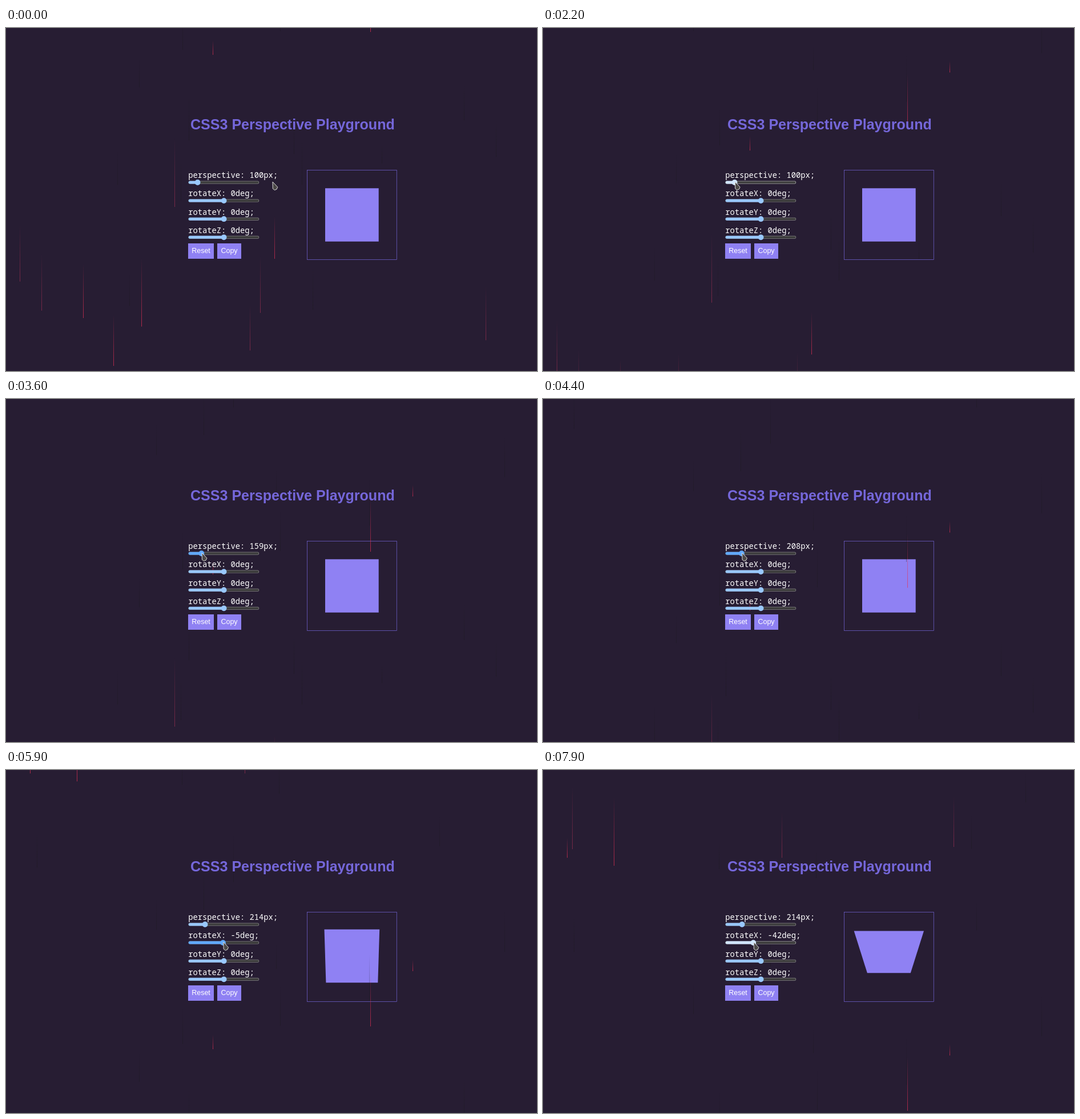
These frames come from a looping animation (930x602 px, 8 s). An HTML page with a canvas:

```html
<!DOCTYPE html>
<html lang="en">
<head>
<meta charset="utf-8">
<title>CSS3 Perspective Playground</title>
<style>
  html, body { margin: 0; width: 100%; height: 100%; overflow: hidden; background: #271d33; }
  #stage { position: absolute; left: 0; top: 0; width: 930px; height: 602px; overflow: hidden; }
  canvas, svg { position: absolute; left: 0; top: 0; }
  h1, .label, .button { position: absolute; margin: 0; white-space: pre; }
  h1 { left: 323px; top: 154px; color: #7567da; font: bold 25.05px/30px "Liberation Sans", Arial, sans-serif; }
  .label { left: 319.3px; color: #fff; font: 13.75px/18px "Noto Sans Mono", "DejaVu Sans Mono", monospace; }
  .button {
    top: 378px; height: 27px; color: #fff; background: #8f81f3; text-align: center;
    font: 12.5px/27px "Liberation Sans", Arial, sans-serif;
  }
</style>
</head>
<body>
<div id="stage">
  <canvas width="930" height="602"></canvas>
  <h1>CSS3 Perspective Playground</h1>
  <div class="label"></div>
  <div class="label"></div>
  <div class="label"></div>
  <div class="label"></div>
  <div class="button" style="left:319px;width:45px">Reset</div>
  <div class="button" style="left:370px;width:42px">Copy</div>
  <svg id="pointer" width="14" height="18" overflow="visible">
    <path d="M0 0 8.7 9.2 7 13 3.5 14.5 .3 12Z" fill="#4b4846" stroke="#eee" stroke-width=".9" stroke-linejoin="round"/>
  </svg>
</div>
<script>
const LOOP = 8000, W = 930, H = 602, ROW = 32.1;
const g = document.querySelector('canvas').getContext('2d');
const labels = [...document.querySelectorAll('.label')];
const pointer = document.getElementById('pointer');
labels.forEach((el, i) => el.style.top = Math.round(249.3 + i * ROW) + 'px');

const mix = (a, b, u) => a + (b - a) * u;

// Linear path through [time, value] points, held at both ends.
function path(points, t) {
  const i = points.findIndex(p => p[0] > t);
  if (i < 0) return points[points.length - 1][1];
  if (i === 0) return points[0][1];
  const [t0, a] = points[i - 1], [t1, b] = points[i];
  return mix(a, b, (t - t0) / (t1 - t0));
}

const fall = [[0, 0], [2200, 168], [3600, 261], [5900, 443], [7900, 591]];
const depth = [[2640, 100], [4400, 208], [4900, 214]];
const tilt = [[5800, 0], [6900, -53], [7100, -53], [7700, -42]];

// The picture refreshes in steps: a pause, then every 100 ms, then about every 258 ms.
function refresh(t) {
  const floor = v => Math.floor(v / 100) * 100;
  if (t < 2200) return t < 100 ? 0 : 100;
  if (t < 5100) return Math.min(floor(t), 4400);
  return floor(5140 + 258 * Math.floor((floor(t) + 99 - 5140) / 258));
}

let seed = 7;
function random() {
  seed = (seed * 16807) % 2147483647;
  return seed / 2147483647;
}

// Leading drops: x, lower end at the start, length
const bright = [
  [188, 593, 90], [470, 405, 75], [237, 524, 120], [135, 509, 95], [362, 47, 25],
  [712, -90, 20], [124, -423, 120], [42, -437, 35], [638, 7, 95]
];
const soft = [
  [62, 496, 100], [445, 500, 100], [840, 548, 95], [24, 445, 100], [427, 566, 80],
  [295, 314, 120], [719, -456, 90], [51, -452, 110], [418, -437, 80]
];
const faint = Array.from({ length: 26 }, () => [
  Math.floor(random() * W), mix(-600, 600, random()), mix(30, 85, random())
]);

function drawRain(drops, tint, alpha, offset) {
  for (const [x, y, len] of drops) {
    const top = y + offset - len;
    if (top > H || top + len < 0) continue;
    const fade = g.createLinearGradient(0, top, 0, top + len);
    fade.addColorStop(0, `rgba(${tint},0)`);
    fade.addColorStop(1, `rgba(${tint},${alpha})`);
    g.fillStyle = fade;
    g.fillRect(x, top, 1, len);
  }
}

const accents = { idle: '#99c8ff', hover: '#d1e6ff', press: '#61a9ff' };

function pill(x, y, w, h, fill) {
  g.beginPath();
  g.roundRect(x, y - h / 2, w, h, h / 2);
  g.fillStyle = fill;
  g.fill();
}

function slider(y, thumb, mode) {
  pill(319.6, y, 123.6, 5, mode === 'hover' ? '#acacac' : '#858585');
  pill(320.3, y, 122.2, 3.6, '#3b3b3b');
  pill(319.6, y, thumb - 319.6, 5, accents[mode]);
  pill(thumb - 4.9, y, 9.8, 9.8, accents[mode]);
}

function preview(perspective, deg) {
  g.strokeStyle = '#7567da';
  g.lineWidth = .7;
  g.strokeRect(527.45, 249.6, 156.8, 156.8);
  const half = 46.85, eye = perspective * .625, angle = deg * Math.PI / 180;
  g.beginPath();
  for (const [x, y] of [[-1, -1], [1, -1], [1, 1], [-1, 1]]) {
    const k = half * eye / (eye - y * half * Math.sin(angle));
    g.lineTo(605.85 + x * k, 328 + y * k * Math.cos(angle));
  }
  g.fillStyle = '#8f81f3';
  g.fill();
}

function modes(t) {
  const first = t < 2200 || t >= 5100 ? 'idle' : t < 2600 ? 'hover' : 'press';
  const second = t < 5600 ? 'idle' : t < 5900 || t >= 7900 ? 'hover' : 'press';
  return [first, second, 'idle', 'idle'];
}

// Parked at first, then the pointer follows the thumb in use.
function movePointer(t, thumbs) {
  const u = path([[4900, 0], [5600, 1]], t);
  const x = t < 2200 ? 467 : mix(thumbs[0], thumbs[1], u) + .8;
  const y = 270 + u * ROW;
  pointer.style.transform = `translate(${x}px,${y}px)`;
}

function render(time) {
  const t = refresh(time), offset = path(fall, t);
  const perspective = Math.round(path(depth, t)), rx = Math.round(path(tilt, t));
  const thumbs = [324.2 + perspective * .114, 381.6 + rx * .317, 381.6, 381.6];

  g.clearRect(0, 0, W, H);
  preview(perspective, rx);
  drawRain(faint, '26,25,27', .4, offset);
  drawRain(soft, '210,55,95', .48, offset);
  drawRain(bright, '230,48,85', .72, offset);
  modes(t).forEach((mode, i) => slider(271 + i * ROW, thumbs[i], mode));
  movePointer(t, thumbs);

  const texts = [`perspective: ${perspective}px;`, `rotateX: ${rx}deg;`, 'rotateY: 0deg;', 'rotateZ: 0deg;'];
  labels.forEach((el, i) => {
    if (el.textContent !== texts[i]) el.textContent = texts[i];
  });
}

const start = performance.now();
function tick() {
  render((performance.now() - start) % LOOP);
  requestAnimationFrame(tick);
}
tick();
</script>
</body>
</html>
```
